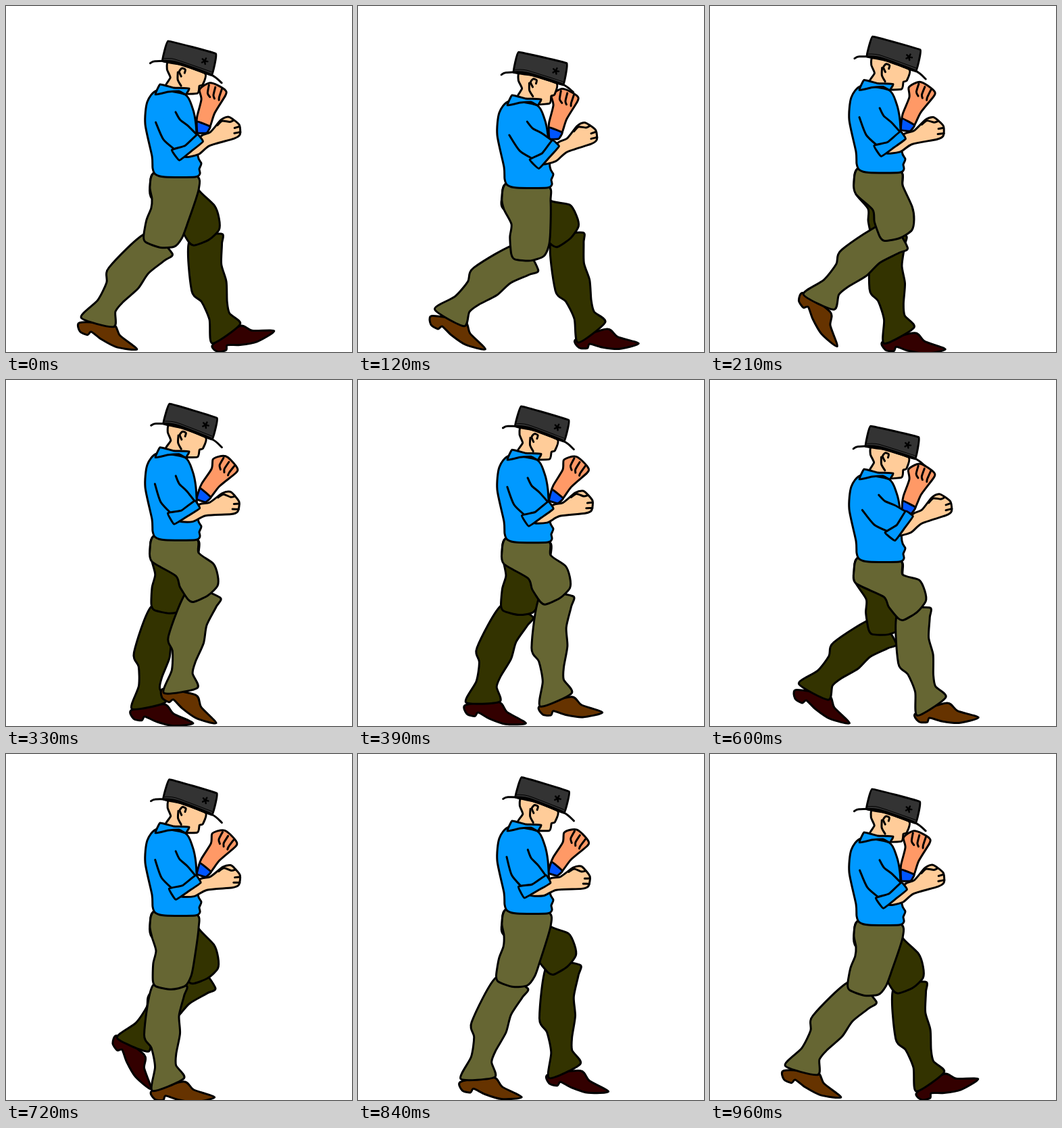
Recreate the animation shown at these times as an HTML page with a canvas. Size 512 by 512 pixels, loop 990 ms.

```html
<!DOCTYPE html>
<html lang="en">
<head>
<meta charset="utf-8">
<title>Walk cycle</title>
<style>
html, body { margin: 0; overflow: hidden; background: #fff; }
canvas { display: block; }
</style>
</head>
<body>
<canvas id="stage" width="512" height="512"></canvas>
<script>
const ctx = document.getElementById('stage').getContext('2d');
const STEP = 30, STEPS = 33, CYCLE = 32, PER_KEY = 4;
const SHIRT = '#0099ff', SKIN = '#ffcc99', FAR_SKIN = '#ff9966';
const FOOT = 72, GROUND = 508, MAX_DROP = 66;

// Both legs share one path, half a cycle apart; the body rises and falls once per step.
const lift = [[0], [16], [-14], [-17]];
const kneePath = [[231, 351], [256, 371], [289, 328], [300, 312], [291, 342], [305, 341], [246, 342], [232, 338]];
const anklePath = [[143, 468], [143, 461], [177, 430], [296, 470], [316, 486], [336, 484], [248, 490], [185, 480]];

// Limb outlines: [offset across the bone in px, position along it in percent].
const thigh = [[-23, 51], [-26, 70], [-25, 95], [-20, 103], [3, 106], [23, 100], [31, 85], [34, 65]];
const shin = [[-24, 0], [-36, 50], [-25, 63], [-19, 82], [-22, 106], [24, 93], [12, 80], [12, 68],
  [17, 48], [15, 30], [22, 10], [24, 0]];
const shoe = [[-14, -28], [-25, -18], [-23, -1], [-16, 2], [-17, 28], [-14, 63], [0, 100], [3, 55], [11, 30]];
const sleeveFront = [[11, 5], [11, 28], [17, 54], [24, 103]];
const sleeveBack = [[-22, 2], [-25, 51], [-17, 92]];
const cuff = [[-22, 85], [-2, 93], [22, 84], [24, 107], [3, 113], [-20, 118]];
const forearm = [[-10, -14], [7, 35], [7, 58], [17, 89], [17, 106], [10, 114], [-1, 121], [-14, 114],
  [-16, 99], [-11, 45], [-16, 15]];
const farForearm = [[7, 0], [12, 24], [14, 74], [21, 97], [17, 113], [9, 126], [-2, 126], [-16, 119],
  [-18, 106], [-11, 49], [-10, -2]];
const farCuff = [[10, 12], [-11, 10], [-9, -10], [4, -18]];

// Upper body outlines, in stage coordinates at zero lift.
const torso = [[224, 125], [209, 142], [206, 175], [216, 222], [217, 240], [221, 249], [235, 253], [280, 253],
  [287, 248], [286, 241], [289, 233], [284, 222], [281, 175], [276, 151], [265, 131]];
const collar = [[228, 116], [248, 121], [271, 122], [266, 131], [256, 126], [240, 127], [221, 131]];
const head = [[241, 82], [238, 94], [243, 106], [236, 118], [244, 130], [283, 129], [286, 118], [291, 116], [294, 99]];
const ear = [[264, 99], [265, 94], [260, 92], [256, 97], [259, 104]];
const jaw = [[254, 98], [254, 109], [259, 118]];
const hat = [[239, 52], [310, 70], [304, 102], [262, 87], [231, 82]];
const brim = [[213, 85], [220, 82], [250, 83], [303, 101], [319, 113]];
const band = [[233, 78], [250, 79], [304, 97]];

function at(track, pos) {
  const i = Math.floor(pos), f = pos - i, n = track.length;
  return track[i % n].map((v, k) => v + (track[(i + 1) % n][k] - v) * f);
}

// Places an outline along the bone from a to b.
function along(outline, a, b) {
  const dx = b[0] - a[0], dy = b[1] - a[1], len = Math.hypot(dx, dy);
  return outline.map(([across, pct]) => [
    a[0] + dx * pct / 100 + across * dy / len,
    a[1] + dy * pct / 100 - across * dx / len
  ]);
}

const move = (pts, x, y) => pts.map(p => [p[0] + x, p[1] + y]);

// End of a bone whose angle is measured in degrees forward from straight down.
function swing([x, y], length, degrees) {
  const a = degrees * Math.PI / 180;
  return [x + length * Math.sin(a), y + length * Math.cos(a)];
}

function trace(pts, closed, bend = 1 / 8) {
  const n = pts.length;
  const get = i => closed ? pts[(i + n) % n] : pts[Math.max(0, Math.min(n - 1, i))];
  ctx.beginPath();
  ctx.moveTo(...pts[0]);
  for (let i = 0; i < (closed ? n : n - 1); i++) {
    const [a, b, c, d] = [-1, 0, 1, 2].map(k => get(i + k));
    ctx.bezierCurveTo(b[0] + (c[0] - a[0]) * bend, b[1] + (c[1] - a[1]) * bend,
      c[0] - (d[0] - b[0]) * bend, c[1] - (d[1] - b[1]) * bend, c[0], c[1]);
  }
}

function shape(pts, fill, bend) {
  trace(pts, true, bend);
  ctx.closePath();
  ctx.fillStyle = fill;
  ctx.fill();
  ctx.stroke();
}

function line(pts) {
  trace(pts, false);
  ctx.stroke();
}

function drawLeg(pos, side, hip, cloth, leather) {
  const [knee] = move([at(kneePath, pos)], side * 4, 0);
  const [ankle] = move([at(anklePath, pos)], side * 9, 0);
  // The toe stays on the ground, except when the heel strikes.
  const toeUp = 27 * Math.max(0, Math.cos((pos - 4) * 1.25)) * (Math.abs(pos - 4) < 2);
  const drop = Math.min(MAX_DROP, GROUND - toeUp - ankle[1]);
  const toe = [ankle[0] + Math.sqrt(FOOT ** 2 - drop ** 2), ankle[1] + drop];
  shape(along(shoe, ankle, toe), leather);
  shape(along(shin, knee, ankle), cloth);
  const seat = move([[-27, -9], [-35, 12], [-32, 30]], ...hip);
  const lap = move([[37, 17], [33, -4]], ...hip);
  shape([...seat, ...along(thigh, hip, knee), ...lap], cloth);
}

function drawFarArm(rise, sway) {
  const elbow = [291 - sway / 3, 180 + rise * .55];
  const fist = swing(elbow, 53, 159 + Math.min(0, rise) + sway);
  shape(along(farForearm, elbow, fist), FAR_SKIN);
  for (let i = 0; i < 3; i++) {
    line(along([[10 - 10 * i, 119], [8 - 9 * i, 96], [3 - 7 * i, 88]], elbow, fist));
  }
  shape(along(farCuff, elbow, fist), '#0055ff', .05);
}

function drawNearArm(rise, sway) {
  const shoulder = [240, 160 + rise];
  const elbow = swing(shoulder, 57, 33 + rise * .6 - sway);
  const fist = swing(elbow, 69, 90 + Math.min(26, 24 + rise * .8));
  shape(along(forearm, elbow, fist), SKIN);
  line(along([[12, 78], [15, 91], [9, 105], [9, 114]], elbow, fist));
  for (let i = 0; i < 2; i++) {
    line(along([[-2 - 7 * i, 109 - 5 * i], [-3 - 8 * i, 120 - 3 * i]], elbow, fist));
  }
  const front = along(sleeveFront, shoulder, elbow), back = along(sleeveBack, shoulder, elbow);
  trace([...front, ...[...back].reverse()], true, 0);
  ctx.fillStyle = SHIRT;
  ctx.fill();
  line(front);
  line(back);
  shape(along(cuff, shoulder, elbow), SHIRT, .06);
}

function drawHead(rise) {
  ctx.save();
  ctx.translate(250, 125 + rise);
  ctx.rotate((.6 - rise * .11) * Math.PI / 180);
  ctx.translate(-250, -125);
  shape(head, SKIN, .08);
  line(ear);
  line(jaw);
  shape(hat, '#333', .03);
  line(brim);
  ctx.lineWidth = 1;
  line(band);
  ctx.lineWidth = 2.5;
  for (let i = 0; i < 5; i++) line([[293.5, 81], swing([293.5, 81], 4.5, i * 72 + 10)]);
  ctx.restore();
}

function draw(pos) {
  const [rise] = at(lift, pos);
  const sway = 3 * Math.cos((pos - .5) * Math.PI / 4);
  const hip = [248, 255 + rise];
  ctx.fillStyle = '#fff';
  ctx.fillRect(0, 0, 512, 512);
  drawFarArm(rise, sway);
  drawLeg((pos + 4) % 8, 1, hip, '#333300', '#330000');
  drawLeg(pos, -1, hip, '#666633', '#663300');
  drawHead(rise);
  shape(move(torso, 0, rise), SHIRT);
  shape(move(collar, 0, rise), SHIRT, .05);
  drawNearArm(rise, sway);
}

ctx.lineWidth = 3;
ctx.lineCap = ctx.lineJoin = 'round';

function tick() {
  const step = Math.floor(performance.now() / STEP) % STEPS;
  draw(step % CYCLE / PER_KEY);
  requestAnimationFrame(tick);
}
tick();
</script>
</body>
</html>
```
